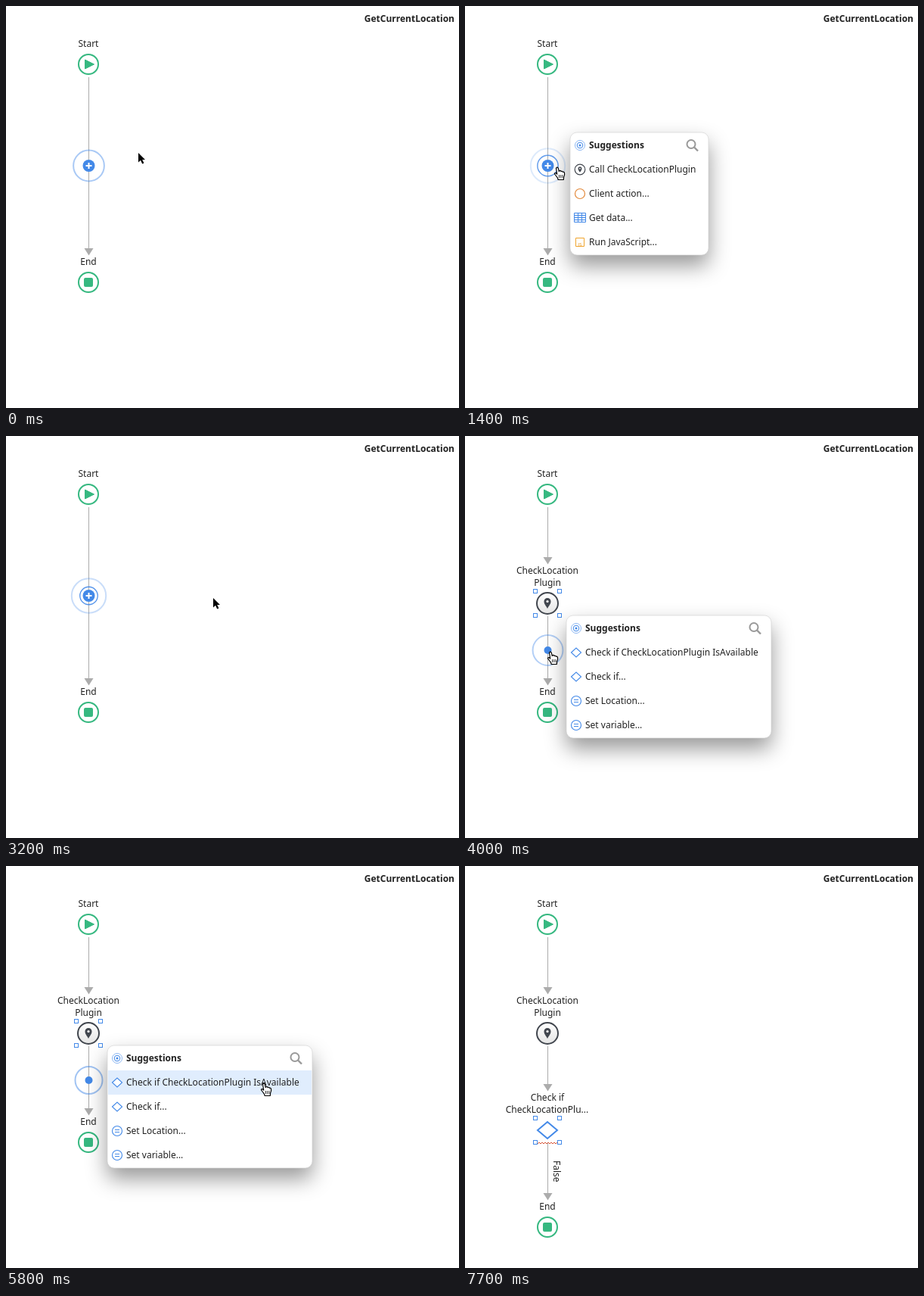
An HTML page that plays this animation: 599x531 px, repeating every 9300 ms.

```html
<!DOCTYPE html>
<html lang="en">
<head>
<meta charset="utf-8">
<style>
  html, body { margin: 0; width: 100%; height: 100%; overflow: hidden; background: #fff; }
  svg { display: block; width: 599px; height: 531px; font: 12px "Noto Sans", sans-serif; fill: none; }
  text { fill: #222; }
  .mid { text-anchor: middle; }
  .bold { font-weight: 600; }
  .card { fill: #fff; stroke: #cfcfcf; stroke-width: .6; filter: drop-shadow(0 14px 14px rgb(0 0 0 / .4)); }
</style>
</head>
<body>
<svg id="stage" viewBox="0 0 599 531"></svg>
<script>
const LOOP = 9300, FRAME = 100;
const BLUE = '#4389e8', GREEN = '#36b880', DARK = '#41464e', GREY = '#acacac';

const label = (s, y, x = 109) => `<text class="mid" x="${x}" y="${y}">${s}</text>`;
const circle = (x, y, r, attrs) => `<circle cx="${x}" cy="${y}" r="${r}" ${attrs}/>`;
const path = (d, attrs) => `<path d="${d}" ${attrs}/>`;
const stroke = (color, width = 1) => `stroke="${color}" stroke-width="${width}"`;
const group = (id, body) => `<g id="${id}">${body}</g>`;

const arrow = (y1, y2) =>
  path(`M109.5 ${y1}V${y2 - 8}`, stroke(GREY)) +
  path(`M103.5 ${y2 - 9}h12l-6 9.5z`, `fill="${GREY}"`);

const handles = y => [93, 125].map(x => [y - 16, y + 16].map(hy =>
  `<rect x="${x - 2.5}" y="${hy - 2.5}" width="5" height="5" fill="#fff" ${stroke(BLUE)}/>`).join('')).join('');

const pin = (x, y, s) =>
  `<g transform="translate(${x} ${y}) scale(${s})">` +
  path('M0 7C-2 3-4.5 1-4.5-2.500A4.500 4.500 0 0 1 4.500-2.500C4.500 1 2 3 0 7Z', `fill="${DARK}"`) +
  circle(0, -2.5, 1.6, 'fill="#fff"') + '</g>';

const diamond = (x, y, w, h, width) =>
  path(`M${x - w} ${y}L${x} ${y - h} ${x + w} ${y} ${x} ${y + h}Z`, `fill="#fff" ${stroke(BLUE, width)}`);

const icons = {
  target: (x, y) => circle(x, y, 6.5, stroke('#8bb6f2')) + circle(x, y, 3.8, stroke(BLUE)) + circle(x, y, 1.5, `fill="${BLUE}"`),
  pin: (x, y) => circle(x, y, 6.8, stroke(DARK, 1.2)) + pin(x, y, .55),
  ring: (x, y) => circle(x, y, 6.5, stroke('#e38a3c', 1.2)),
  table: (x, y) => path(`M${x - 7.5} ${y - 6.5}h15v12h-15zm0 3h15m-15 3h15m-15 3h15m-10-9v12m5-12v12`, stroke(BLUE)),
  script: (x, y) => path(`M${x - 5.5} ${y - 5.5}h11v11h-11z`, stroke('#f0a52e')) +
    `<text x="${x - 2.5}" y="${y + 4.5}" font-size="6" style="fill:#e8951a">JS</text>`,
  branch: (x, y) => diamond(x, y, 6.5, 6, 1.1),
  assign: (x, y) => circle(x, y, 6.5, stroke(BLUE, 1.1)) + path(`M${x - 3} ${y - 1.5}h6m-6 3h6`, stroke(BLUE, 1.1))
};

function menu(id, { x, y, w, items }) {
  const rows = [['target', 'Suggestions'], ...items].map(([icon, title], i) => {
    const cy = y + 17 + i * 32;
    return icons[icon](x + 13, cy) + `<text x="${x + 25}" y="${cy + 4}" ${i ? '' : 'class="bold"'}>${title}</text>`;
  }).join('');
  const lens = x + w - 23;
  return group(id,
    `<rect class="card" x="${x}" y="${y}" width="${w}" height="162" rx="9"/>` +
    `<rect id="${id}Hover" x="${x + 1}" y="${y + 33}" width="${w - 2}" height="32" fill="#e0edfd"/>` + rows +
    circle(lens, y + 15.5, 5.5, stroke('#999', 2)) + path(`M${lens + 4} ${y + 19.5}l5 5`, stroke('#999', 2.4)));
}

const menus = {
  menu1: { x: 139, y: 167, w: 183, from: 1200, to: 3100, items: [
    ['pin', 'Call CheckLocationPlugin'], ['ring', 'Client action...'],
    ['table', 'Get data...'], ['script', 'Run JavaScript...']] },
  menu2: { x: 134, y: 237, w: 271, from: 4000, to: 6100, items: [
    ['branch', 'Check if CheckLocationPlugin IsAvailable'], ['branch', 'Check if...'],
    ['assign', 'Set Location...'], ['assign', 'Set variable...']] }
};
const INSERT_CALL = 3300, INSERT_CHECK = 6300;

const $ = id => document.getElementById(id);
$('stage').innerHTML =
  `<defs><linearGradient id="metal" x2="0" y2="1"><stop stop-color="#fff"/><stop offset="1" stop-color="#e4e4e4"/></linearGradient></defs>
  <text class="bold" x="593" y="21" text-anchor="end">GetCurrentLocation</text>` +
  label('Start', 54) + circle(109, 77, 13, stroke(GREEN, 2)) +
  path('M104.500 71l12 6-12 6z', `fill="${GREEN}" ${stroke(GREEN)} stroke-linejoin="round"`) +
  group('direct', arrow(94, 329)) +
  group('call', arrow(94, 169) + label('CheckLocation', 182) + label('Plugin', 198) +
    circle(109, 221, 14, `fill="url(#metal)" ${stroke(DARK, 2)}`) + pin(109, 221, 1)) +
  group('callActive', arrow(238, 329) + handles(221)) +
  group('check', arrow(238, 297) + label('Check if', 310) + label('CheckLocationPlu...', 326, 108.5) +
    diamond(109, 349, 13, 11, 2) + arrow(366, 441) +
    path('M96 367' + 'l2-2 2 2'.repeat(7), stroke('#d9583a')) + handles(349) +
    '<text transform="translate(117 389) rotate(90)">False</text>') +
  path('M106.500 347.500h4l-1.500 3z', `id="speck" fill="${DARK}"`) +
  group('end', label('End', 342) + circle(109, 365, 13, stroke(GREEN, 2)) +
    `<rect x="103" y="359" width="12" height="12" rx="2" fill="${GREEN}"/>`) +
  group('pulse', circle(0, 0, 0, 'id="oldRing"') + circle(0, 0, 0, 'id="newRing"') +
    circle(0, 0, 0, `id="dot" fill="${BLUE}"`) + path('M-4 0h8m-4-4v8', `id="plus" ${stroke('#fff', 2)}`)) +
  menu('menu1', menus.menu1) + menu('menu2', menus.menu2) +
  group('cursor',
    path('M0 0V12.500L3 9.700 5.200 14.600 7.400 13.600 5.200 8.900H9Z', `id="pointer" fill="#000" ${stroke('#fff', 1.6)} paint-order="stroke"`) +
    group('hand',
      path('M-1.500 1.300Q0-1 1.300 1.300L2.300 5.500 3 4.600Q4.800 4 5 5.600 6.800 4.600 7.300 6.300 9 5.700 9.500 7.500 10.200 10 8.600 13L8.300 16.500H1.200L.5 14.200Q-1.500 11.500-3.400 9-3.800 7-1.600 7.800L-.3 9Z',
        `fill="#fff" ${stroke('#000', 1.2)} stroke-linejoin="round"`) +
      path('M2.500 10v4m2.200-4v4m2.200-4v4', stroke('#000', .8))));

// Pointer stops: time, x, y
const stops = [[300, 175, 194], [1000, 122, 213], [1500, 122, 213], [2000, 274, 214], [3400, 274, 214],
  [3900, 113, 285], [4200, 113, 285], [4700, 341, 287], [7300, 341, 287], [7600, 250, 499]];

function pointerAt(t) {
  const i = stops.findIndex(s => s[0] > t);
  if (i === 0) return stops[0].slice(1);
  if (i < 0) return stops.at(-1).slice(1);
  const [a, b] = [stops[i - 1], stops[i]];
  const u = (t - a[0]) / (b[0] - a[0]), e = u * u * (3 - 2 * u);
  return [a[1] + (b[1] - a[1]) * e, a[2] + (b[2] - a[2]) * e];
}

const show = (id, on) => { $(id).style.display = on ? '' : 'none'; };

function drawRing(id, age, start) {
  const ring = $(id);
  ring.setAttribute('r', Math.min(22.7, start + 12 * age));
  ring.setAttribute('stroke', BLUE);
  ring.setAttribute('stroke-width', Math.min(2, 1.2 + age));
  ring.setAttribute('opacity', Math.max(0, 1 - .65 * age));
}

function draw(t) {
  const called = t >= INSERT_CALL, checked = t >= INSERT_CHECK;
  show('direct', !called);
  show('call', called);
  show('callActive', called && !checked);
  show('check', checked);
  show('speck', checked && t < 7100);
  $('end').setAttribute('transform', `translate(0 ${checked ? 112 : 0})`);

  const plusY = called ? 283 : 211, age = (t + 840) % 980 / 1000;
  show('pulse', !checked);
  show('plus', !called);
  $('pulse').setAttribute('transform', `translate(109.5 ${plusY})`);
  $('dot').setAttribute('r', called ? 5 : 8);
  drawRing('newRing', age, called ? 8.9 : 10.3);
  drawRing('oldRing', age + .98, called ? 8.9 : 10.3);

  const [x, y] = pointerAt(t);
  let hot = !checked && Math.hypot(x - 109, y - plusY) < 15;
  for (const [id, m] of Object.entries(menus)) {
    const open = t >= m.from && t < m.to;
    const over = open && x > m.x && x < m.x + m.w && y > m.y + 33 && y < m.y + 65;
    show(id, open);
    show(id + 'Hover', over);
    hot ||= over;
  }
  show('cursor', t < 7700);
  show('hand', hot);
  show('pointer', !hot);
  $('cursor').setAttribute('transform', `translate(${x} ${y})`);
}

const origin = performance.now();
function tick() {
  const t = (performance.now() - origin) % LOOP;
  draw(Math.floor(t / FRAME) * FRAME);
  requestAnimationFrame(tick);
}
tick();
</script>
</body>
</html>
```
